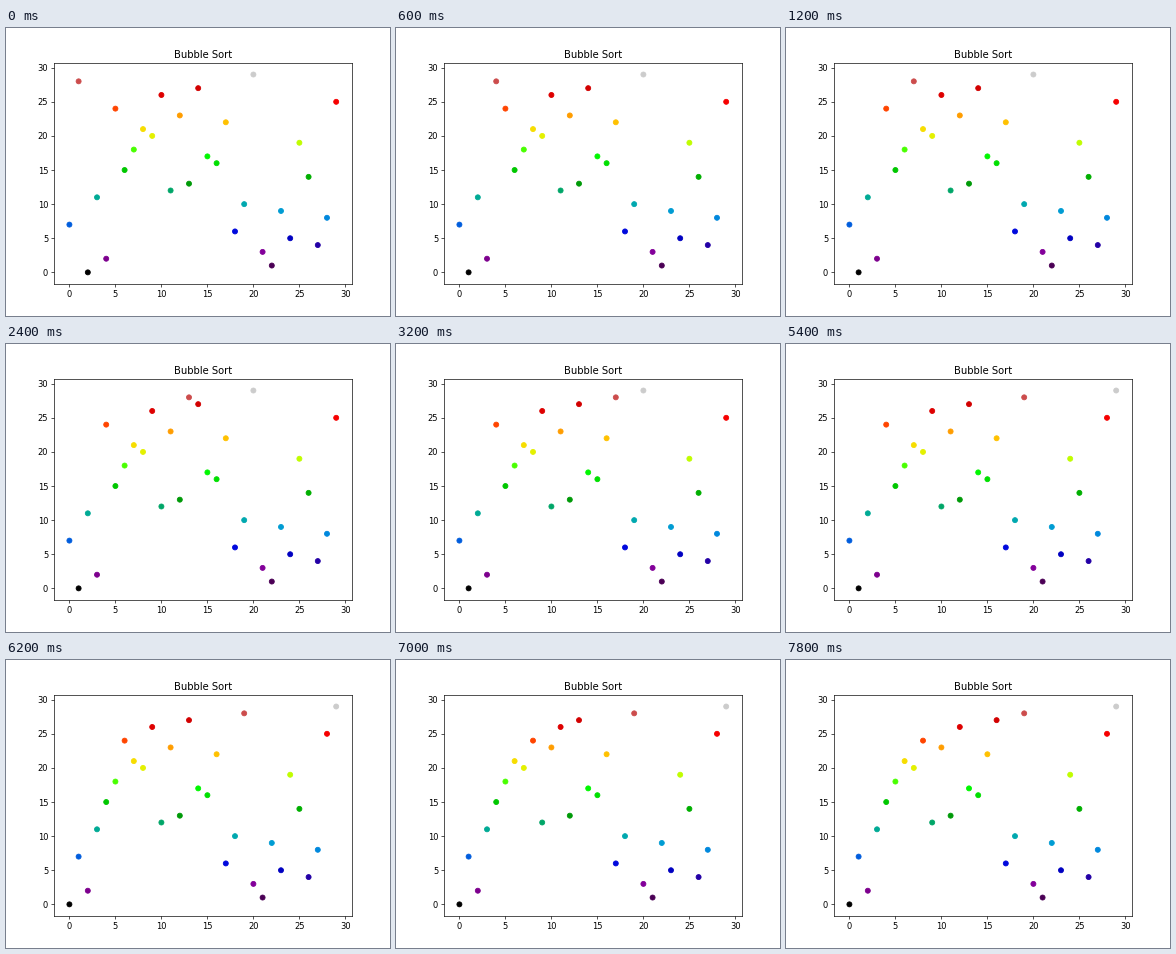
These frames come from a looping animation (384 px wide and 288 px high, 8 s). A matplotlib script:

```python
import matplotlib.pyplot as plt
import numpy as np
from matplotlib.animation import FuncAnimation

FRAMES = 40
INTERVAL = 200
# the unsorted input; everything else follows from the sort itself
START = [7, 28, 0, 11, 2, 24, 15, 18, 21, 20, 26, 12, 23, 13, 27,
         17, 16, 22, 6, 10, 29, 3, 1, 9, 5, 19, 14, 4, 8, 25]
COUNT = len(START)
VALUES = np.arange(COUNT)


def bubble_sort(items):
    """Yield the order before sorting and again after every swap."""
    items = list(items)
    yield items[:]
    for end in range(len(items) - 1, 0, -1):
        for i in range(end):
            if items[i] > items[i + 1]:
                items[i], items[i + 1] = items[i + 1], items[i]
                yield items[:]


def padded(pad):
    """Axis limits with a 5 % margin around the dots and their radius."""
    margin = pad + 0.05 * (COUNT - 1 + 2 * pad)
    return -margin, COUNT - 1 + margin


states = [order for order, _ in zip(bubble_sort(START), range(FRAMES))]


def offsets(step):
    # argsort of a permutation gives the position of each value
    return np.column_stack([np.argsort(states[step]), VALUES])


fig, ax = plt.subplots(figsize=(6.4, 4.8), dpi=60)
dots = ax.scatter(*offsets(0).T, c=VALUES, cmap="nipy_spectral")

# the dot radius is the same in pixels, so its share of y is larger
pad = 0.205
box = ax.get_window_extent()
ax.set_xlim(padded(pad))
ax.set_ylim(padded(pad * box.width / box.height))
ticks = range(0, COUNT + 1, 5)
ax.set(xticks=ticks, yticks=ticks, title="Bubble Sort")


def update(step):
    dots.set_offsets(offsets(step))
    return (dots,)


anim = FuncAnimation(fig, update, frames=FRAMES, interval=INTERVAL,
                     init_func=lambda: update(0), repeat=True,
                     repeat_delay=0)
plt.show()
```
